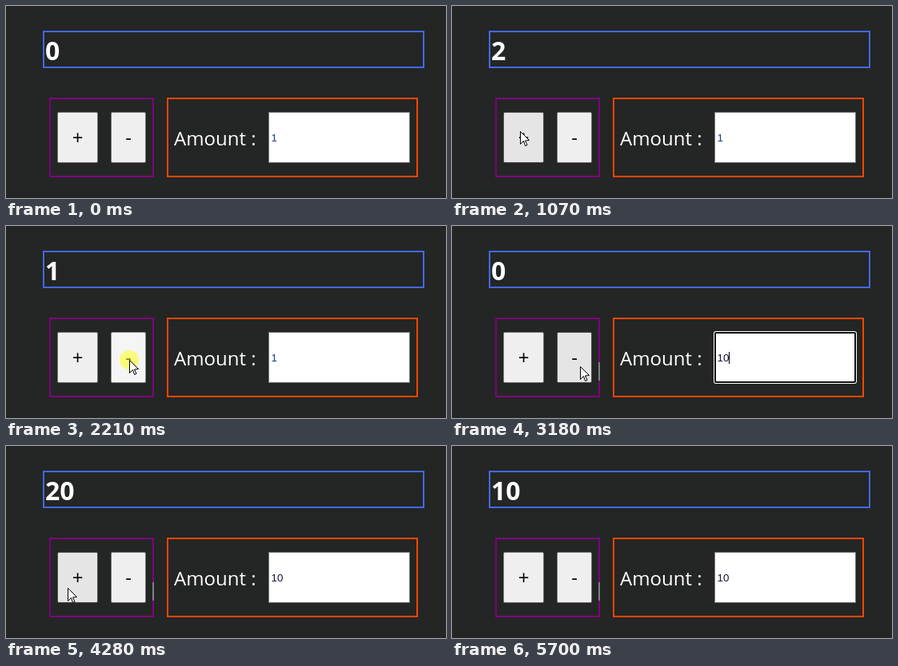
An HTML page with a canvas for the animation above (5.9 s loop, 550 by 241 pixels).

```html
<!DOCTYPE html>
<html lang="en">
<head>
<meta charset="utf-8">
<title>Counter</title>
<style>
html, body { margin: 0; width: 100%; height: 100%; overflow: hidden; background: #242625; }
canvas { display: block; }
</style>
</head>
<body>
<canvas id="stage" width="550" height="241"></canvas>
<script>
const ctx = document.getElementById('stage').getContext('2d');
const LOOP = 5900;
const STEP = 70; // the pointer moves in ticks of this length
const HOLD = 70; // how long a click stays down
const SANS = '"Open Sans", "Noto Sans", sans-serif';
const PLUS = { x: 64, y: 133, w: 51, h: 64, label: '+' };
const MINUS = { x: 131, y: 133, w: 44, h: 64, label: '-' };
const INPUT = { x: 328, y: 133, w: 177, h: 64 };

const ENTER = { at: 130, x: 260, y: 202 };
const LEAVE = 5700;
const FOCUS = 2630, TYPED = 2960, BLUR = 3800, BLINK = 500, SLIVER = 3110;

const moves = [
  { from: 130, until: 470, x: 85, y: 157 },
  { from: 1400, until: 1540, x: 154, y: 168 },
  { from: 2350, until: 2420, x: 299, y: 165 },
  { from: 2490, until: 2560, x: 391, y: 166 },
  { from: 3030, until: 3180, x: 160, y: 176 },
  { from: 3250, until: 3600, x: 77, y: 178 },
  { from: 4610, until: 4690, x: 144, y: 178 },
  { from: 5300, until: 5560, x: 514, y: 232 }
];

// Runs of evenly spaced clicks; each click adds "by" after "lag".
const bursts = [
  { start: 860, gap: 140, clicks: 3, by: 1, lag: HOLD },
  { start: 1870, gap: 170, clicks: 3, by: -1, lag: HOLD },
  { start: FOCUS, gap: 0, clicks: 1, by: 0, lag: HOLD },
  { start: BLUR, gap: 205, clicks: 3, by: 10, lag: 200 },
  { start: 5030, gap: 140, clicks: 2, by: -10, lag: HOLD }
];
const clicks = bursts.flatMap(b =>
  Array.from({ length: b.clicks }, (_, i) => ({ ...b, at: b.start + i * b.gap })));

const easeOut = p => 1 - (1 - p) * (1 - p);
const inside = (p, r) => p.x >= r.x && p.x < r.x + r.w && p.y >= r.y && p.y < r.y + r.h;

function pointerAt(t) {
  let { x, y } = ENTER;
  for (const move of moves) {
    if (t < move.from) break;
    const steps = Math.round((move.until - move.from) / STEP) + 1;
    const step = Math.min(steps, Math.floor((t - move.from) / STEP) + 1);
    const k = easeOut(step / steps);
    x += (move.x - x) * k;
    y += (move.y - y) * k;
  }
  return { x: Math.round(x), y: Math.round(y), shown: t >= ENTER.at && t < LEAVE };
}

function text(str, x, y, font, color, align = 'left') {
  ctx.font = font;
  ctx.fillStyle = color;
  ctx.textAlign = align;
  ctx.fillText(str, x, y);
}

function frame(x, y, w, h, color) {
  ctx.strokeStyle = color;
  ctx.lineWidth = 2;
  ctx.strokeRect(x + 1, y + 1, w - 2, h - 2);
}

// Fills a box grown (or shrunk) by the given margin.
function fillBox({ x, y, w, h }, margin, radius, color) {
  ctx.fillStyle = color;
  ctx.beginPath();
  ctx.roundRect(x - margin, y - margin, w + 2 * margin, h + 2 * margin, radius);
  ctx.fill();
}

function drawButton(b, pointer, down) {
  const hover = pointer.shown && inside(pointer, b);
  const [edge, face] = !hover ? ['#767676', '#efefef'] : down ? ['#8d8d8d', '#f5f5f5'] : ['#4f4f4f', '#e5e5e5'];
  fillBox(b, 0, 2, edge);
  fillBox(b, -1, 1, face);
  text(b.label, b.x + b.w / 2, 174, `24px ${SANS}`, '#000', 'center');
}

function drawInput(t) {
  const focused = t >= FOCUS && t < BLUR;
  const typed = t >= TYPED;
  if (focused) {
    fillBox(INPUT, 1, 3, '#fff');
    fillBox(INPUT, 0, 2, '#101010');
    fillBox(INPUT, -2, 0, '#fff');
  } else {
    fillBox(INPUT, 0, 0, '#767676');
    fillBox(INPUT, -1, 0, '#fff');
  }
  const value = typed ? '10' : '1';
  text(value, INPUT.x + 3.5, 170, '13.333px "Liberation Sans", Arial, sans-serif', typed ? '#14143a' : '#1a3c80');
  if (focused && t < TYPED + BLINK) {
    ctx.fillStyle = '#000';
    ctx.fillRect(INPUT.x + 4 + 7 * value.length, 158, 1, 15);
  }
}

function drawArrow(x, y) {
  const points = [[0, 0], [0, 16], [4, 12], [6, 18], [8.5, 17], [6, 11.5], [11, 11]];
  ctx.beginPath();
  for (const [dx, dy] of points) ctx.lineTo(x + dx + 0.5, y + dy + 0.5);
  ctx.closePath();
  ctx.fillStyle = '#fff';
  ctx.fill();
  ctx.strokeStyle = '#000';
  ctx.lineWidth = 1;
  ctx.stroke();
}

function drawBeam(x, y) {
  ctx.fillStyle = '#000';
  ctx.fillRect(x, y - 8, 1, 16);
  for (const edge of [y - 8, y + 7]) {
    ctx.fillRect(x - 3, edge, 3, 1);
    ctx.fillRect(x + 1, edge, 3, 1);
  }
}

function drawPointer(p, down) {
  if (!p.shown) return;
  if (down) {
    ctx.fillStyle = 'rgba(255, 255, 0, 0.5)';
    ctx.beginPath();
    ctx.arc(p.x, p.y, 12, 0, Math.PI * 2);
    ctx.fill();
  }
  (inside(p, INPUT) ? drawBeam : drawArrow)(p.x, p.y);
}

function draw(t) {
  const pointer = pointerAt(t);
  const down = clicks.some(c => t >= c.at && t < c.at + HOLD);
  const count = clicks.reduce((sum, c) => t >= c.at + c.lag ? sum + c.by : sum, 0);

  ctx.fillStyle = '#242625';
  ctx.fillRect(0, 0, 550, 241);
  frame(46, 31, 477, 47, '#4169e1');
  frame(54, 115, 131, 100, '#800080');
  frame(201, 115, 314, 100, '#ff4500');

  text(count, 49, 68, `bold 32px ${SANS}`, '#fff');
  text('Amount :', 210, 175, `24px ${SANS}`, '#fff');
  drawButton(PLUS, pointer, down);
  drawButton(MINUS, pointer, down);
  drawInput(t);
  if (t >= SLIVER) {
    ctx.fillStyle = '#808080';
    ctx.fillRect(183, 171, 2, 23);
  }
  drawPointer(pointer, down);
}

const began = performance.now();
function tick() {
  draw((performance.now() - began) % LOOP);
  requestAnimationFrame(tick);
}
tick();
</script>
</body>
</html>
```
